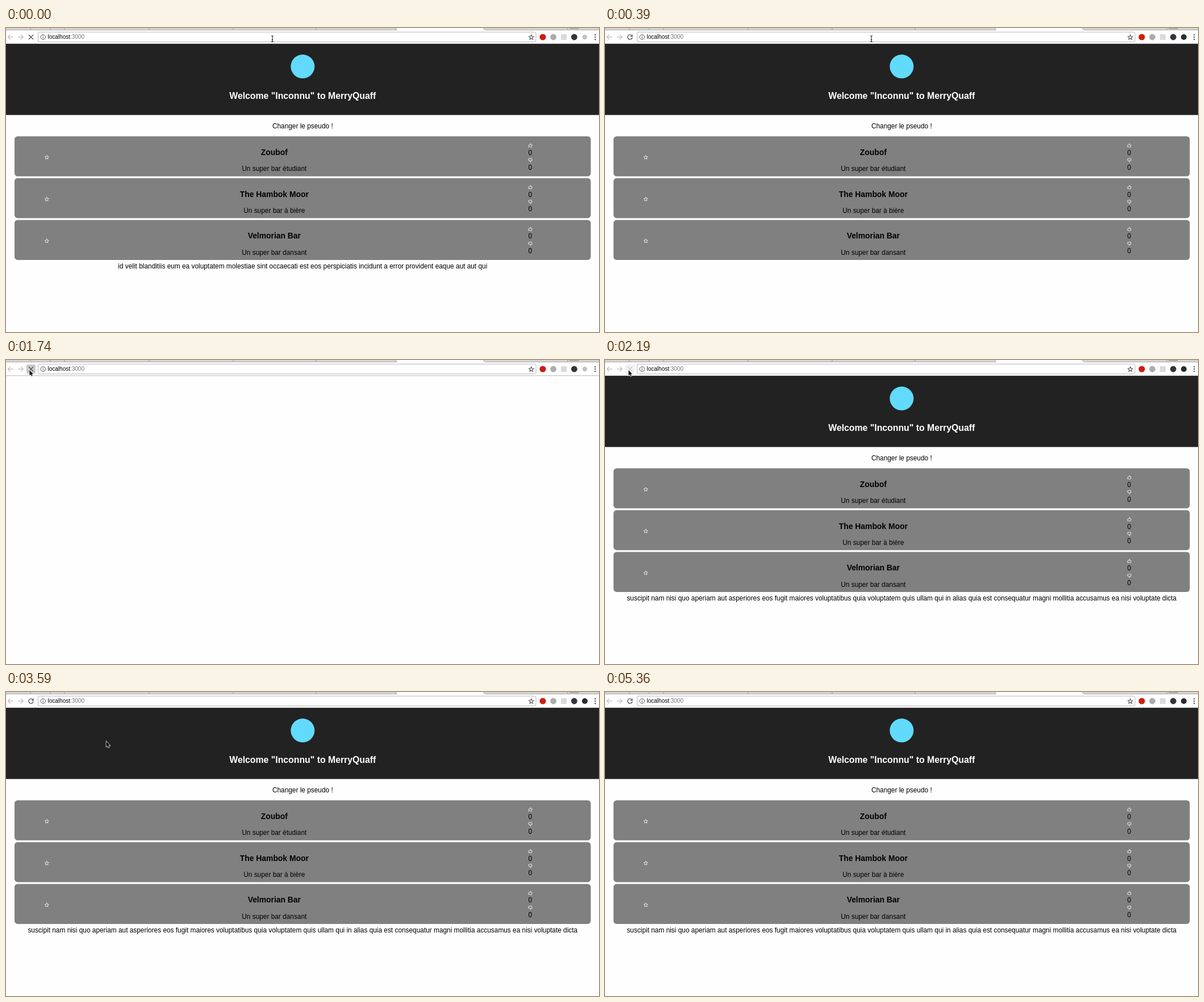
Recreate the animation shown at these times as an HTML page. Size 1044 by 536 pixels, loop 5460 ms.

```html
<!DOCTYPE html>
<html lang="fr">
<head>
<meta charset="utf-8">
<title>Bars</title>
<style>
html, body { margin: 0; width: 100%; height: 100%; overflow: hidden; background: #fefefe; }
svg { display: block; width: 1044px; height: 536px; font: 11.86px "Liberation Sans", Arial, sans-serif; }
.mid { text-anchor: middle; }
.bold { font-weight: bold; }
.line { fill: none; stroke: #555; stroke-width: 1.4; }
.pale { stroke: #c6c6c6; }
.icon { fill: none; stroke: #fff; stroke-width: .8; stroke-linejoin: round; }

/* Hard switches */
.page, .text, .reload, .stop, .busy, .ready, .hover, .beam, .arrow {
  animation: 5460ms step-end infinite;
}
.page { animation-name: page; }
.first { animation-name: first; }
.second { animation-name: second; }
.third { animation-name: third; }
.reload { animation-name: reload; }
.stop { animation-name: stop; }
.busy { animation-name: busy; }
.ready { animation-name: ready; }
.hover { animation-name: hover; }
.beam { animation-name: beam; }
.arrow { animation-name: arrow; }
.path { animation: path 5460ms linear infinite; }

@keyframes page { 0%, 7.14%, 36.26% { opacity: 1 } 1.09%, 31.86% { opacity: 0 } 100% { opacity: 1 } }
@keyframes first { 0% { opacity: 1 } 1.09%, 100% { opacity: 0 } }
@keyframes second { 0%, 31.86%, 100% { opacity: 0 } 10.98% { opacity: 1 } }
@keyframes third { 0% { opacity: 0 } 40.1%, 100% { opacity: 1 } }
@keyframes reload { 0%, 28.02% { opacity: 0 } 7.14%, 64.1%, 100% { opacity: 1 } }
@keyframes stop { 0%, 28.02% { opacity: 1 } 7.14%, 64.1%, 100% { opacity: 0 } 36.26% { opacity: .22 } }
@keyframes busy { 0%, 28.02% { opacity: 1 } 7.14%, 36.26%, 100% { opacity: 0 } }
@keyframes ready { 0%, 28.02% { opacity: 0 } 7.14%, 36.26%, 100% { opacity: 1 } }
@keyframes hover {
  0%, 64.1%, 100% { fill: #fefefe }
  20.5% { fill: #dadada }
  28.02% { fill: #cacaca }
  36.26% { fill: #f1f1f1 }
}
@keyframes beam { 0% { opacity: 1 } 12.63%, 100% { opacity: 0 } }
@keyframes arrow { 0% { opacity: 0 } 12.63%, 100% { opacity: 1 } }
@keyframes path {
  0%, 10.98% { transform: translate(469px, 19px) }
  14.28% { transform: translate(300px, 6px) }
  17.03% { transform: translate(130px, 3px) }
  20.15% { transform: translate(50px, 14px) }
  21.98%, 63.18% { transform: translate(41.5px, 18px) }
  65.2% { transform: translate(130px, 64px) }
  67.4% { transform: translate(310px, 154px) }
  70.88% { transform: translate(667px, 326px) }
  75.6%, 75.7% { transform: translate(832px, 402px) }
  81.68% { transform: translate(987px, 498px) }
  83.33% { transform: translate(1010px, 514px) }
  91.94%, 100% { transform: translate(1030px, 540px) }
}
</style>
</head>
<body>
<svg viewBox="0 0 1044 536">
  <defs>
    <path id="star" d="M0-3.6 1-1.2 3.5-1 1.6.7 2.2 3.2 0 1.9-2.2 3.2-1.6.7-3.5-1-1-1.2Z"/>
    <path id="thumb" d="M-3-.4H-1.4L.3-3.2Q1.5-3.1 1.1-1.7L.8-.8H2.9Q3.5-.4 3 .4L2.3 3H-.6L-1.4 2.6H-3Z"/>
    <g id="card">
      <rect x="15" y="191" width="1014.5" height="70.5" rx="5.5" fill="#808080"/>
      <g class="icon">
        <use href="#star" x="71.8" y="228"/>
        <use href="#thumb" x="923" y="207"/>
        <use href="#thumb" transform="translate(923 233) scale(1 -1)"/>
      </g>
      <g class="mid">
        <text x="922.8" y="223.9">0</text>
        <text x="922.8" y="249.7">0</text>
      </g>
    </g>
  </defs>

  <rect width="1044" height="536" fill="#fefefe"/>

  <!-- Tab strip -->
  <path d="M0 0H687L689 3.5H0ZM840 0H1044V3.5H842Z" fill="#d6d6d3"/>
  <path d="M0 3.5H688L686 0M840 0 843 3.5H1044" class="line" style="stroke:#ababab;stroke-width:1"/>
  <path d="M42 0 44 3M77 0 79 3M102 0 104 3M251 0 253 3M401 0 399 3M545 0 547 3M988 0 990 3" class="line" style="stroke:#999;stroke-width:1"/>
  <rect x="992" y="0" width="17" height="2" rx="1" fill="#aaa"/>

  <!-- Toolbar -->
  <path d="M0 27.7H1044" stroke="#b8b8b8"/>
  <g class="line pale">
    <path d="M12.5 16H3.5M7.5 11.8 3.3 16 7.5 20.2"/>
    <path d="M21 16H30M26 11.8 30.2 16 26 20.2"/>
  </g>
  <rect class="hover" x="36" y="8" width="16" height="16" rx="2"/>
  <g class="reload">
    <path class="line" d="M47.2 13.4A4.1 4.1 0 1 0 48 17"/>
    <path d="M48.6 11.2V15.4H44.4Z" fill="#555"/>
  </g>
  <path class="line stop" d="M40 12 48 20M48 12 40 20"/>
  <rect x="56.5" y="7.2" width="876.5" height="17.3" rx="2.5" fill="#fff" stroke="#b7b7b7"/>
  <circle class="line" cx="65.3" cy="16" r="4.2" style="stroke-width:1"/>
  <path d="M65.3 13.2V14.4M65.3 15.3V18.6" stroke="#555" stroke-width="1.1"/>
  <text x="73.5" y="19.4" font-size="10">localhost<tspan fill="#777">:3000</tspan></text>
  <use href="#star" class="line" transform="translate(924.8 16.2) scale(1.2)" style="stroke-width:.9"/>
  <circle cx="945" cy="16" r="5.6" fill="#cf1d12"/>
  <circle cx="963.6" cy="16" r="5.4" fill="#acacac"/>
  <rect x="977" y="11" width="10" height="10" fill="#dadada"/>
  <circle cx="1000.4" cy="16" r="5.4" fill="#30353a"/>
  <circle class="busy" cx="1019" cy="16" r="4.2" fill="#c2c2c2"/>
  <circle class="ready" cx="1019" cy="16" r="5" fill="#2a2a2a"/>
  <g fill="#555">
    <circle cx="1037.3" cy="12" r="1.2"/>
    <circle cx="1037.3" cy="16" r="1.2"/>
    <circle cx="1037.3" cy="20" r="1.2"/>
  </g>

  <g class="page">
    <rect y="28" width="1044" height="125.4" fill="#222"/>
    <circle cx="522.3" cy="67.8" r="21" fill="#61dafb"/>
    <text class="mid bold" x="522.3" y="124.6" font-size="15.82" fill="#fff">Welcome "Inconnu" to MerryQuaff</text>
    <text class="mid" x="522.3" y="176.6">Changer le pseudo !</text>
    <use href="#card"/>
    <use href="#card" y="73.7"/>
    <use href="#card" y="147.4"/>
    <g class="mid bold" font-size="13.88">
      <text x="472.3" y="224">Zoubof</text>
      <text x="472.3" y="297.7">The Hambok Moor</text>
      <text x="472.3" y="371.4">Velmorian Bar</text>
    </g>
    <g class="mid">
      <text x="472.3" y="252.2">Un super bar étudiant</text>
      <text x="472.3" y="325.9">Un super bar à bière</text>
      <text x="472.3" y="399.6">Un super bar dansant</text>
    </g>
  </g>
  <g class="mid">
    <text class="text first" x="522.3" y="423.6">id velit blanditiis eum ea voluptatem molestiae sint occaecati est eos perspiciatis incidunt a error provident eaque aut aut qui</text>
    <text class="text second" x="522.3" y="423.6">molestias id nostrum excepturi molestiae dolore omnis repellendus quaerat saepe consectetur iste quaerat tenetur asperiores accusamus ex ut nam quidem est ducimus sunt debitis saepe</text>
    <text class="text third" x="522.3" y="423.6">suscipit nam nisi quo aperiam aut asperiores eos fugit maiores voluptatibus quia voluptatem quis ullam qui in alias quia est consequatur magni mollitia accusamus ea nisi voluptate dicta</text>
  </g>

  <g class="path">
    <path class="beam" d="M-2-5.3Q0-5.3 0-4 0-5.3 2-5.3M0-4V4M-2 5.3Q0 5.3 0 4 0 5.3 2 5.3M-1.2 1.5H1.2" fill="none" stroke="#222" stroke-width="1.1"/>
    <path class="arrow" d="M0 0V9.2L2.1 7.3 3.6 10.7 5.1 10 3.7 6.7H6.5Z" stroke="#fff" stroke-width="1.4" paint-order="stroke"/>
  </g>
</svg>
</body>
</html>
```
